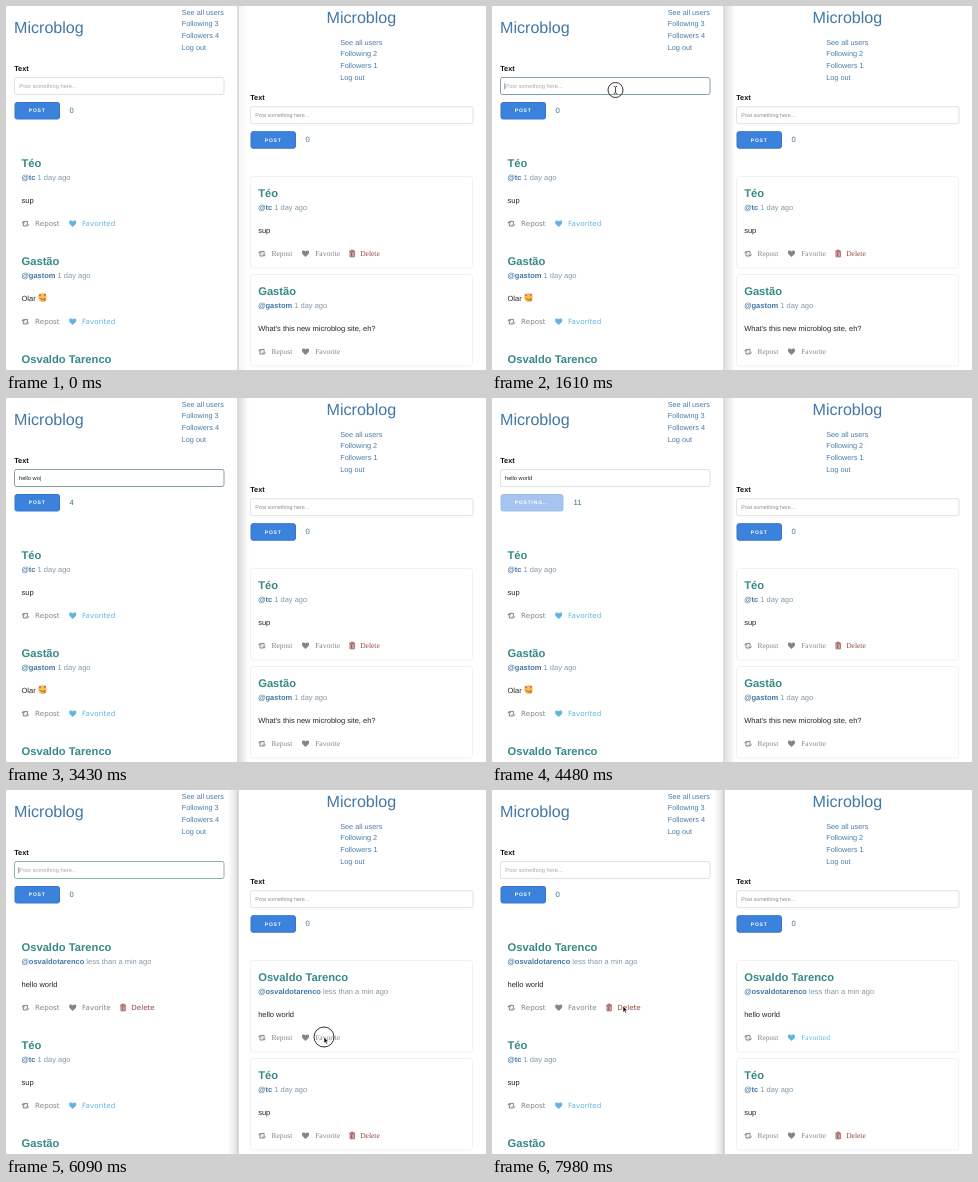
Recreate the animation shown at these times as an HTML page. Size 480x364 px, loop 8 s.

```html
<!DOCTYPE html>
<html lang="en">
<head>
<meta charset="utf-8">
<title>Microblog, two windows</title>
<style>
  html, body { margin: 0; width: 100%; height: 100%; overflow: hidden; background: #fff; }
  svg { display: block; width: 480px; height: 364px; }
  text { font-family: "Liberation Sans", sans-serif; text-rendering: geometricPrecision; white-space: pre; }
  .wide { font-family: "DejaVu Sans", sans-serif; }
  .serif { font-family: "Liberation Serif", serif; }
  .bold { font-weight: 700; }
  .button { font-weight: 700; letter-spacing: .8px; }
</style>
</head>
<body>
<svg id="stage" viewBox="0 0 480 364"></svg>
<script>
const LOOP = 8000;
const BLUE = '#4377a5', LINK = '#4b7ba6', GRAY = '#858585', RED = '#984440', SKY = '#62b5e0';
const MESSAGE = 'hello world';
const KEY_TIMES = [2170, 2310, 2450, 2660, 2870, 3080, 3220, 3430, 3570, 3710, 3850];
const COUNTER_LAG = 570;
const CLICK = 1610, SEND = 4410, POSTED = 4900, BLUR = 6160, FAVORITED = 7070;

const POSTS = {
  fresh: { name: 'Osvaldo Tarenco', handle: '@osvaldotarenco', age: 'less than a min ago', body: MESSAGE },
  teo: { name: 'Téo', handle: '@tc', age: '1 day ago', body: 'sup' },
  gastao: { name: 'Gastão', handle: '@gastom', age: '1 day ago', body: 'Olar', emoji: true },
  site: { name: 'Gastão', handle: '@gastom', age: '1 day ago', body: "What's this new microblog site, eh?" },
  older: { name: 'Osvaldo Tarenco', handle: '@osvaldotarenco', age: '1 day ago', body: '' },
};

const ICONS = {
  repost: '<path d="M2.6 1.2H5.9V4.6M.3 3 1.8 1.2 3.3 3M1.8 1.5V5.8H5M4.4 4.2 5.9 6 7.4 4.2" fill="none" stroke="currentColor" stroke-width=".9"/>',
  heart: '<path d="M4 7C1.7 5 .4 3.9.4 2.3.4.5 2.8-.2 4 1.5 5.2-.2 7.6.5 7.6 2.3 7.6 3.9 6.3 5 4 7Z" fill="currentColor"/>',
  trash: '<path d="M0 1.2H6M2 .9V.2H4V.9M.9 2.2V6.8H5.1V2.2ZM2.3 3V6M3.7 3V6" fill="none" stroke="currentColor" stroke-width=".9"/>',
};

const clamp = v => Math.max(0, Math.min(1, v));
const ramp = (t, from, to) => clamp((t - from) / (to - from));
const ease = v => v * v * (3 - 2 * v);

const text = (x, y, size, fill, content, cls = '') =>
  `<text x="${x}" y="${y}" font-size="${size}" fill="${fill}" class="${cls}">${content}</text>`;
const box = (x, y, w, h, fill, stroke = 'none', radius = 2) =>
  `<rect x="${x}" y="${y}" width="${w}" height="${h}" rx="${radius}" fill="${fill}" stroke="${stroke}"/>`;
const icon = (name, x, y, color) =>
  `<g transform="translate(${x} ${y})" color="${color}">${ICONS[name]}</g>`;

function emoji(x, y) {
  const hearts = [[-4, -3.6], [1, -4], [1, 1.4]].map(([dx, dy]) =>
    `<g transform="translate(${x + dx} ${y + dy}) scale(.34)" color="#dd5a48">${ICONS.heart}</g>`).join('');
  return `<circle cx="${x}" cy="${y}" r="4.3" fill="#f2bf55"/>
    <path d="M${x - 2.4} ${y + .8}q2.4 2.6 4.8 0" fill="none" stroke="#7a4a1c" stroke-width=".7"/>${hearts}`;
}

// x is the text margin, y the baseline of the name.
function post(x, y, p, actions) {
  let out = text(x, y, 11.2, '#378a88', p.name, 'bold')
    + text(x, y + 13, 7.5, '#8399a6', `<tspan class="bold" fill="${BLUE}">${p.handle}</tspan> ${p.age}`)
    + text(x, y + 36.3, 7.5, '#252525', p.body);
  if (p.emoji) out += emoji(x + 21, y + 32.6);
  const [cls, size, gap] = actions.serif
    ? ['serif', 7.5, [0, 13.3, 43.3, 57, 91, 102]]
    : ['wide', 7.15, [0, 13.6, 47.2, 60.6, 98.6, 109.8]];
  const base = y + 59.2;
  const heartColor = actions.liked ? SKY : GRAY;
  out += icon('repost', x + gap[0], base - 6, '#777') + text(x + gap[1], base, size, GRAY, 'Repost', cls)
    + icon('heart', x + gap[2], base - 6.3, heartColor)
    + text(x + gap[3], base, size, heartColor, actions.liked ? 'Favorited' : 'Favorite', cls);
  if (actions.own)
    out += icon('trash', x + gap[4], base - 6.2, RED) + text(x + gap[5], base, size, RED, 'Delete', cls);
  return out;
}

const feed = (x, y, entries) =>
  entries.map(([p, actions], i) => post(x, y + i * 98, p, actions)).join('');

const links = (x, y, lines) =>
  lines.map((line, i) => text(x, y + i * 11.7, 7.3, LINK, line)).join('');

function form(x, y, width, s) {
  const textY = y + 17.2;
  const caret = s.caret ? '<tspan fill="#333">|</tspan>' : '';
  const content = s.typed
    ? text(x + 5, textY, 5.7, '#222', s.typed + caret)
    : text(x + 5.3, textY, s.hintSize, s.hintColor, 'Post something here...') + text(x + 4, textY, 6.4, '#333', caret);
  const [face, edge] = s.posting ? ['#a5c4ef', '#9fbfe9'] : ['#3b82dc', '#3674c6'];
  return text(x + .2, y, 7.3, '#111', 'Text', 'bold')
    + box(x + .5, y + 6.5, width, 17, '#fff', s.border || '#e2e2e2') + content
    + box(x + 1, y + 31.5, s.posting ? 62 : 44.5, 16.5, face, edge)
    + text(x + 14.8, y + 41.3, 5, '#fff', s.posting ? 'POSTING...' : 'POST', 'button')
    + text(x + (s.posting ? 73.5 : 55.5), y + 42, 7.7, s.countColor, s.count);
}

function leftWindow(t) {
  const typedBy = time => KEY_TIMES.filter(k => k <= time).length;
  const posting = t >= SEND && t < POSTED;
  const focused = t >= CLICK && t < BLUR && !posting;
  const focusStart = t < POSTED ? CLICK : POSTED;
  const typing = t >= KEY_TIMES[0] && t < SEND;
  const done = t >= POSTED;
  const liked = { liked: true };
  const old = [[POSTS.teo, liked], [POSTS.gastao, liked], [POSTS.older, {}]];
  const entries = done ? [[POSTS.fresh, { own: true }], ...old] : old;
  return text(8, 27.2, 16.1, '#4478a8', 'Microblog')
    + links(175.7, 8.7, ['See all users', 'Following 3', 'Followers 4', 'Log out'])
    + form(8, 65, 209.5, {
      posting,
      typed: done ? '' : MESSAGE.slice(0, typedBy(t)),
      count: done ? 0 : typedBy(t - COUNTER_LAG),
      countColor: '#3a7183',
      border: focused ? (done ? '#8fb0aa' : '#869fab') : '',
      caret: focused && (typing || (t - focusStart) % 1000 < 500),
      hintSize: 5.75, hintColor: '#aaa',
    })
    + feed(15.5, 161, entries.slice(0, 3));
}

function rightWindow(t) {
  const old = [[POSTS.teo, { serif: true, own: true }], [POSTS.site, { serif: true }]];
  const entries = t >= POSTED ? [[POSTS.fresh, { serif: true, liked: t >= FAVORITED }], ...old] : old;
  const cards = [170.5, 268.5].map(y => box(244.5, y, 222, 91.5, 'none', '#f1f1f1', 3)).join('');
  return text(320.5, 17, 16.1, '#4478a8', 'Microblog')
    + links(334.2, 38.6, ['See all users', 'Following 2', 'Followers 1', 'Log out'])
    + form(244, 94.2, 222.5, { count: 0, countColor: '#456f92', hintSize: 5.4, hintColor: '#8c8c8c' })
    + cards + feed(252.2, 191, entries.slice(0, 2));
}

// The focused window casts its shadow over the other one.
function divider(t) {
  const rightFront = ramp(t, 5950, 6090);
  const leftFront = .3 + .7 * ramp(t, 910, 1190) - rightFront;
  return `<defs><linearGradient id="shade"><stop stop-opacity="0"/><stop offset="1" stop-opacity=".13"/></linearGradient></defs>
    <rect x="222" width="10" height="364" fill="url(#shade)" opacity="${rightFront}"/>
    <rect x="-243" width="10" height="364" fill="url(#shade)" opacity="${leftFront}" transform="scale(-1 1)"/>
    <rect x="231.5" width="1" height="364" fill="#b9b9b9"/>`;
}

function pointer(t) {
  const moves = [
    [140, 840, 300, 215, 123.5, 84],
    [5390, 6020, 158, 128, 318, 247],
    [7420, 7980, 318, 247, 131, 216],
  ];
  const visible = (t >= 140 && t < 2240) || t >= 5390;
  if (!visible) return '';
  const [from, to, x0, y0, x1, y1] = moves.filter(m => t >= m[0]).pop();
  const p = ease(ramp(t, from, to));
  const x = x0 + (x1 - x0) * p, y = y0 + (y1 - y0) * p;
  const pressed = (t >= 910 && t < 1050) || (t >= CLICK && t < 1750) || (t >= 6020 && t < 6300);
  const overInput = y > 71 && y < 88 && x > 8 && x < 218;
  const shape = overInput
    ? '<path d="M-1.7-3.5Q0-3.5 0-2.5 0-3.5 1.7-3.5M0-2.5V2.5M-1.7 3.5Q0 3.5 0 2.5 0 3.5 1.7 3.5" fill="none" stroke="#222" stroke-width=".8"/>'
    : '<path d="M0 0V6.2L1.4 5 2.4 7.2 3.4 6.8 2.5 4.6H4.4Z" fill="#111" stroke="#fff" stroke-width=".5"/>';
  const ring = pressed ? `<circle r="${overInput ? 7.5 : 10}" fill="none" stroke="#333"/>` : '';
  return `<g transform="translate(${x} ${y})">${ring}${shape}</g>`;
}

const stage = document.getElementById('stage');
let shown = '';

function draw(now) {
  const t = now % LOOP;
  const markup = leftWindow(t) + rightWindow(t) + divider(t) + pointer(t);
  if (markup !== shown) stage.innerHTML = shown = markup;
}

const start = performance.now();
function tick() {
  draw(performance.now() - start);
  requestAnimationFrame(tick);
}
tick();
</script>
</body>
</html>
```
